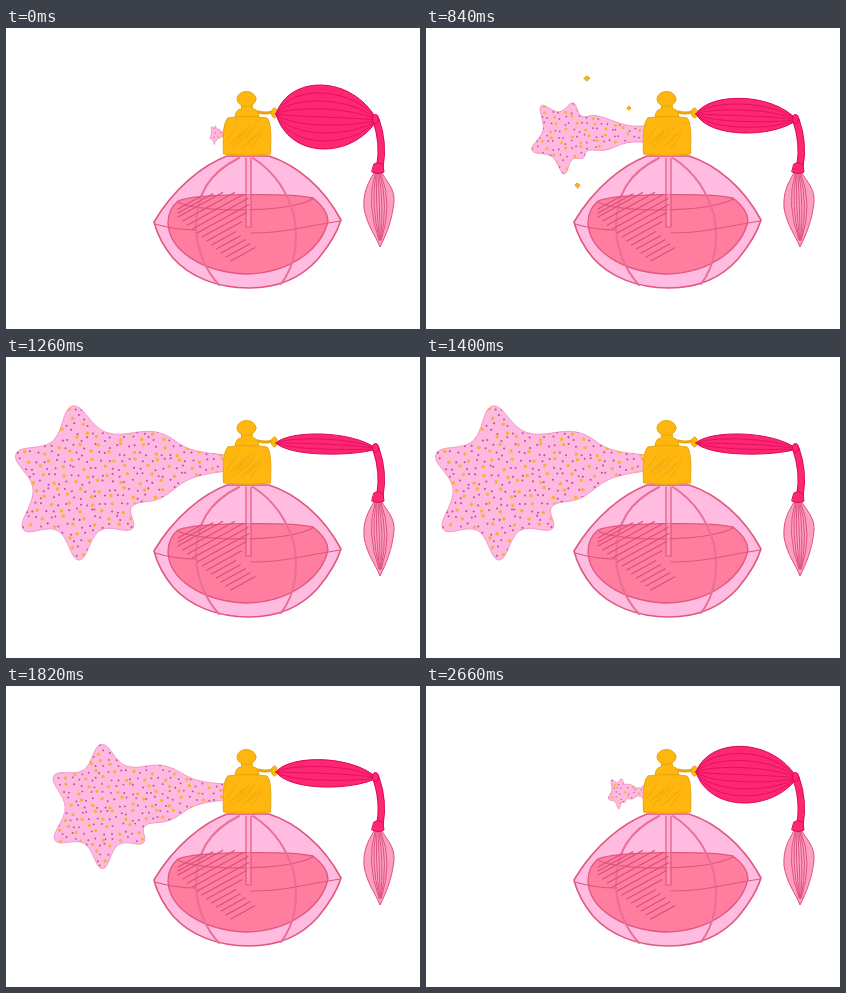
An HTML page that plays this animation: 414 by 301 pixels, repeating every 2800 ms.

```html
<!DOCTYPE html>
<html lang="en">
<head>
<meta charset="utf-8">
<title>Perfume spray</title>
<style>
html, body { margin: 0; width: 100%; height: 100%; overflow: hidden; background: #fff; }
svg { display: block; width: 100vw; height: 100vh; fill: none; stroke-linecap: round; stroke-linejoin: round; }
</style>
</head>
<body>
<svg viewBox="0 0 414 301">
  <defs><clipPath id="clip"><path id="clipShape"/></clipPath></defs>

  <g id="spray">
    <path id="cloud" fill="#fdb9df" stroke="#f59aca"/>
    <g clip-path="url(#clip)">
      <path id="gold" stroke="#fbb034"/>
      <path id="plum" stroke="#c4519c"/>
    </g>
    <path id="sparks" stroke="#e9a20c" fill="#ffb60f" d="M158 50l3-2 3 2-3 3zM201 80l2-2 2 2-2 2zM149 157l2-2 3 2-2 3z"/>
  </g>

  <g id="bottle" stroke="#e0577f" stroke-width="1.6">
    <path fill="#ffbbe0" d="M221 128C197 137 168 160 148 194C151 206 158 219 167 230C184 249 211 260 243 260C274 260 296 249 312 231C322 219 330 208 335 192C318 160 291 137 263 128Z"/>
    <path fill="#ff7d9f" stroke-width="1.3" d="M172 173C190 165 286 165 307 170C316 177 322 185 322 193C317 216 290 245 240 246C195 244 163 222 162 195C162 185 166 178 172 173Z"/>
    <path stroke-width="1.3" d="M172 174C187 184 278 186 307 171"/>
    <path stroke="#e96f97" stroke-width="2" d="M233 130C203 145 190 166 190 200C191 224 201 244 213 257M247 130C270 145 281 164 288 187C293 216 288 239 275 256"/>
    <path stroke-width="1.2" d="M149 196Q169 202 190 202M245 205Q268 205 289 201T334 193"/>
    <path fill="#ffa9cb" fill-opacity=".4" stroke-width="1.2" d="M240 130V199H245V130"/>
    <path id="shade" stroke="#d94f7d" stroke-width="1.2"/>
  </g>

  <g id="cap" fill="#ffb60f" stroke="#e8a50d">
    <path stroke-width="3" d="M252 84Q260 86 266 84"/>
    <path d="M236 77H246L247 81Q252 81 253 89H229Q230 81 235 81Z"/>
    <ellipse cx="240.5" cy="71" rx="9.5" ry="7.5"/>
    <path d="M222 90Q241 87 261 90Q266 94 264.500 126Q241 129 217.500 126Q216 94 222 90Z"/>
    <path id="capShade" fill="none" stroke="#e8a60e" stroke-width=".8"/>
    <ellipse cx="268.5" cy="85" rx="3" ry="5"/>
  </g>

  <g stroke="#d80b56">
    <path stroke-width="7.500" d="M370 92Q378 115 374 138"/>
    <path stroke="#ff2673" stroke-width="5.500" d="M370 92Q378 115 374 138"/>
    <path id="bulb" fill="#ff2673"/>
    <path id="ribs" stroke="#e2125f"/>
    <ellipse cx="369.5" cy="91" rx="3" ry="4.5" fill="#ff2673"/>
    <path fill="#ff9fbf" stroke="#df507c" d="M368 145C362 155 357 164 358 180C361 198 370 208 374 219C380 207 386 193 388 174C389 160 380 153 376 145Z"/>
    <path id="fringe" stroke="#dc5580"/>
    <path fill="#ff2673" d="M368 136Q373 133 377 137L378 144Q372 147 366 144Z"/>
  </g>
</svg>
<script>
const $ = id => document.getElementById(id);
const draw = (id, d) => $(id).setAttribute('d', d);
const mix = (a, b, t) => a.map((v, k) => v + (b[k] - v) * t);
const range = n => [...Array(n).keys()];

function randomizer(seed) {
  return () => (seed = seed * 16807 % 2147483647) / 2147483647 - .5;
}

const nozzle = [219, 106];
const lips = [[219, 98], [219, 114]];
const reach = [15, 37, 49, 75, 114, 175, 209];

// Lobe tips of the half-blown and the full cloud, from nozzle top round to nozzle bottom.
const puff = [[200, 97], [172, 88], [147, 75], [115, 78], [106, 122], [138, 146], [157, 130], [180, 122], [200, 115]];
const burst = [[184, 92], [150, 75], [67, 49], [10, 97], [17, 172], [73, 203], [126, 172], [155, 141], [184, 122]];

// Smooth curve through all points.
function smooth(pts) {
  const at = i => pts[Math.max(0, Math.min(pts.length - 1, i))];
  let d = 'M' + pts[0];
  for (let i = 0; i < pts.length - 1; i++) {
    const c1 = at(i).map((v, k) => v + (at(i + 1)[k] - at(i - 1)[k]) / 5);
    const c2 = at(i + 1).map((v, k) => v - (at(i + 2)[k] - at(i)[k]) / 5);
    d += `C${c1} ${c2} ${at(i + 1)}`;
  }
  return d + 'Z';
}

// Small clouds shrink the puff towards the nozzle, large ones grow it into the burst.
function cloudPath(length) {
  const size = Math.min(1, length / 114);
  const growth = Math.max(0, (length - 114) / 95);
  const tips = puff.map((p, i) => {
    const [x, y] = mix(p, burst[i], growth);
    return [nozzle[0] + (x - nozzle[0]) * size, nozzle[1] + (y - nozzle[1]) * (.15 + .85 * size)];
  });
  const left = nozzle[0] - length;
  const centre = [left + length * .31, nozzle[1] + 14 * growth + 4 * size];
  const pts = [lips[0]];
  tips.forEach((tip, i) => {
    pts.push(tip);
    const inHead = i > 0 && i < tips.length - 2;
    if (inHead) pts.push(mix(mix(tip, tips[i + 1], .5), centre, .22));
  });
  return smooth([...pts, lips[1]]);
}

function confetti(gap) {
  const random = randomizer(7);
  const dots = { gold: '', plum: '' };
  for (let row = 0, y = 46; y < 206; y += gap, row++)
    for (let col = 0, x = 8 + row % 2 * gap / 2; x < 220; x += gap, col++) {
      const kind = (col + row * 2) % 3 ? 'plum' : 'gold';
      dots[kind] += `M${x + random() * gap * .7} ${y + random() * gap * .7}h.1`;
    }
  return dots;
}

// Curve along the bulb whose middle sits at height y.
function bulbArc(y, back) {
  const c = (y - 22.25) / .75;
  return back ? `C346 ${c} 283 ${c} 270 86` : `M270 86C283 ${c} 346 ${c} 371 92`;
}

draw('shade', range(14).map(i => {
  const x = 172 + Math.max(0, i - 2) * 4.8, y = 181 + i * 4;
  const length = 24 + 32 * Math.sin(Math.min(1, i / 9) * Math.PI);
  return `M${x} ${y}l${length} ${-length * .55}`;
}).join(''));
draw('capShade', range(9).map(i => `M${221 + i * 3} ${112 + i % 3 * 4}l${10 + i % 2 * 4} -14`).join(''));
draw('fringe', range(7).map(i => `M${369 + i} 146Q${360 + i * 4.5} 176 ${373 + i * .4} 212`).join(''));

let shown = -1;
function show(step) {
  if (step === shown) return;
  shown = step;
  const cloud = cloudPath(reach[step]);
  draw('cloud', cloud);
  draw('clipShape', cloud);
  const gap = 4.2 + step / 2;
  const dots = confetti(gap);
  for (const kind in dots) draw(kind, dots[kind]);
  $('gold').setAttribute('stroke-width', gap * .48);
  $('plum').setAttribute('stroke-width', gap * .28);
  $('sparks').style.display = step === 4 ? '' : 'none';

  const middle = 89 - step / 3, half = 32 - step * 22 / 6;
  const ribs = half > 22 ? 7 : half > 15 ? 5 : 3;
  draw('bulb', bulbArc(middle - half) + bulbArc(middle + half, true) + 'Z');
  draw('ribs', range(ribs).map(i => bulbArc(middle - half + 2 * half * (i + 1) / (ribs + 1))).join(''));
}

// The squeeze takes 1400 ms, then the steps run back.
function tick() {
  const time = performance.now() % 2800;
  show(time < 1400 ? Math.floor(time / 210) : Math.min(6, 7 - Math.floor((time - 1400) / 210)));
  requestAnimationFrame(tick);
}
tick();
</script>
</body>
</html>
```
